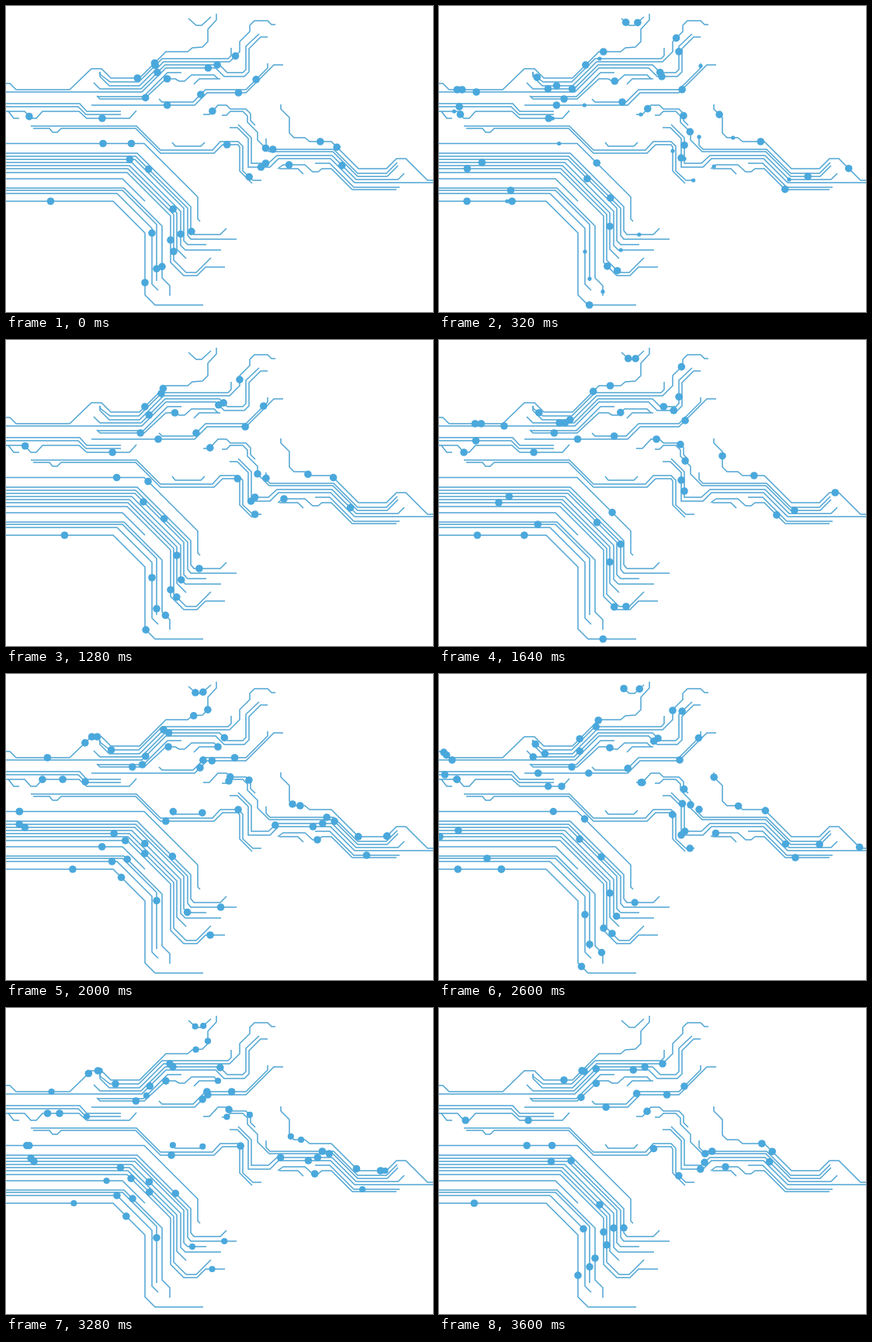
Recreate the animation shown at these times as an HTML page with a canvas. Size 550 by 395 pixels, loop 3640 ms.

```html
<!DOCTYPE html>
<html lang="en">
<head>
<meta charset="utf-8">
<title>Circuit traces</title>
<style>
html, body { margin: 0; width: 100%; height: 100%; overflow: hidden; background: #fff; }
canvas { display: block; }
</style>
</head>
<body>
<canvas id="stage" width="550" height="395"></canvas>
<script>
const ctx = document.getElementById('stage').getContext('2d');
const LOOP = 3640, STEP = 40, HALF = LOOP / 6, CYCLE = 2;
const RADIUS = 4.8, FADE = 0.3;
const traces = [];

// A dot visits distances along its trace at shared beats.
const rider = (lead, ...beats) => (...stops) =>
  ({ lead, keys: stops.map((d, i) => ({ t: beats[i], d })) });
const early = rider(0.04, 1.02, 2.03, 3.02, 3.66, 4.03);
const late = rider(0.1, 2.03, 3.02, 3.66, 4.03);
const long = rider(0.3, 1.66, 3.02, 3.66, 4.03);
const brief = rider(0.3, 1.66, 2.03);

function trace(points, ...dots) {
  const pts = points.split(' ').map(p => p.split(',').map(Number));
  const path = new Path2D(), segs = [];
  let from = 0;
  pts.forEach(([x, y], i) => {
    path.lineTo(x, y);
    if (!i) return;
    const [px, py] = pts[i - 1], len = Math.hypot(x - px, y - py);
    segs.push({ px, py, x, y, len, from });
    from += len;
  });
  traces.push({ path, segs, dots, length: from });
}

// Level from the left edge, then 45 degrees down until x.
function fan(y, turn, x, rest, ...dots) {
  trace(`0,${y} ${turn},${y} ${x},${y + x - turn} ${rest}`.trim(), ...dots);
}

// Upper left
trace('235,16 245,25 252,25 264,14', early(4, 23), early(29, 12));
trace('0,100 5,100 13,108 82,108 110,81 123,81 135,93 172,93 206,59 234,59 240,54 253,53 260,46 260,30 271,18 271,10',
  early(6, 113, 204, 256, 277), early(11, 125, 238, 271, 298), brief(17, 57), brief(109, 132));
trace('121,85 121,88 134,98 171,98 201,68 286,68 290,64 290,54', early(7, 21, 100));
trace('121,85 121,91 133,103 172,103 203,72 288,72 301,59 301,46 314,33 314,25 320,19 337,19 342,24 347,24',
  early(26, 106, 221, 257));
trace('113,99 121,107 174,107 205,76 275,76 285,86 305,86 309,82 309,52 326,36',
  early(11, 113, 188, 206), early(254, 187, 75, 13));
trace('0,111 175,111 206,80 270,80 281,91 307,91 313,85 313,55 328,40 337,40', early(16, 182, 292, 350));
trace('118,117 177,117 208,86 226,86', brief(5, 58));
trace('117,116 121,120 178,120 206,94 218,94 223,97 230,97 239,89 268,89 273,94',
  long(8, 115, 148, 174), long(132, 56, 8));
trace('242,101 249,94 276,94');
trace('110,128 243,128 259,112 309,112 345,76 357,76', early(17, 143, 207, 228), long(208, 83));
trace('197,120 201,124 241,124 257,108 309,108 337,80 337,74', long(10, 156), long(139, 49, 10));

// Far left
trace('0,126 95,126 104,136 148,136');
trace('0,130 93,130 103,140 148,140', early(7, 106));
trace('0,136 24,136 32,145 39,145 47,136 94,136 104,145 159,145 168,135', early(23, 55, 152), early(170, 81, 23));
trace('3,136 10,145 17,145');

// Centre
trace('32,155 168,155 199,186 266,186 276,175 299,175 305,181 305,213 318,225 329,225', long(248, 348));
trace('35,158 56,158 60,163 66,163 71,158 167,158 199,190 268,190 279,179 299,179 301,182 301,213 317,229', late(189, 289));
trace('214,176 218,181 251,181 256,176', brief(7, 2), brief(37, 42));
fan(177.5, 178, 247, '247,275 250,278', late(18, 147), late(18, 191, 297));
trace('254,140 262,140 273,128 284,128 289,133 309,133 315,139 315,148 321,154', early(6, 68), early(81, 42, 8));

// Right
trace('354,127 354,133 365,144 365,164 371,170 385,170 391,175 419,175 454,210 490,210 503,197 515,197 543,225 550,225',
  early(254, 149, 102, 70, 47), early(6, 58), brief(204, 186), late(186, 65));
trace('335,171 335,180 340,185 422,185 453,216 490,216 504,202', long(139, 4));
trace('278,141 284,141 289,136 305,136 311,142 311,150 324,163 324,173 339,188 421,188 453,220 491,220 505,206',
  early(260, 180, 70, 37, 10));
trace('299,153 316,170 316,203 338,203 349,193 420,193 451,224 505,224 513,216', early(20, 91, 202), long(208, 58));
trace('288,157 298,157 312,171 312,208 340,208 351,197 418,197 449,228 550,228', long(206, 67, 10));
trace('398,203 417,203 448,234 507,234', brief(120, 79));
trace('350,210 357,205 385,205 395,214 402,214 407,210 419,210 446,237 503,237', early(127, 56, 8));
trace('352,210 376,210 383,217');

// Lower left
fan(190, 169, 238, '238,290 242,295 276,295 284,287', long(186, 314));
fan(194, 167, 234, '234,296 238,301 297,301', late(18, 226, 306, 342));
fan(198, 166, 229, '229,303 234,308 258,308', late(25, 187, 254, 304));
fan(202, 162, 225, '225,309 231,315 277,315', early(24, 186, 300));
fan(206, 159, 220, '220,314 232,326', long(68, 261, 269));
fan(210, 157, 216, '216,328 232,344 245,344 264,325', early(0, 188, 309, 355));
fan(215, 156, 212, '212,331 229,348 246,348 257,337 282,337', long(73, 292, 339, 358));
fan(223, 150, 179, '', brief(79, 124));
fan(235, 152, 201, '201,351 211,361 211,374', long(75, 300));
fan(238, 150, 194, '194,355', early(61, 223, 279));
fan(242, 143, 188, '188,359 196,367', long(82, 230));
fan(252, 138, 179, '179,373 192,386 254,386', early(24, 86), early(80, 153, 282, 348), late(-52, 80));

// Every half cycle starts slowly and speeds up.
function beatAt(ms) {
  const h = (ms - 80) / HALF, n = Math.floor(h);
  return n + 1 + (h - n) ** 2;
}

function distanceAt(keys, t) {
  let i = keys.findIndex(k => k.t > t);
  if (i < 0) i = keys.length - 1;
  const a = keys[Math.max(0, i - 1)], b = keys[Math.max(1, i)];
  const span = b.t - a.t, s = (t - a.t) / span;
  return a.d + (b.d - a.d) * (span > 0.7 ? s * (1.5 - 0.5 * s) : s);
}

function drawDot({ segs, length }, { lead, keys }, t) {
  const start = keys[0].t - lead, end = keys[keys.length - 1].t + FADE;
  for (let b = t + CYCLE * Math.ceil((start - t) / CYCLE); b < end; b += CYCLE) {
    const d = Math.min(distanceAt(keys, b), length);
    const s = segs.find(q => d <= q.from + q.len) || segs[segs.length - 1];
    const k = (d - s.from) / s.len;
    const size = Math.min(1, (b - start) / 0.03, (end - b) / FADE);
    ctx.beginPath();
    ctx.arc(s.px + (s.x - s.px) * k, s.py + (s.y - s.py) * k, RADIUS * size, 0, 7);
    ctx.fill();
  }
}

ctx.strokeStyle = '#4fa5d3';
ctx.fillStyle = '#4aa8dc';
ctx.lineWidth = 1.5;

function frame() {
  const ms = Math.floor(performance.now() % LOOP / STEP) * STEP;
  const t = (beatAt(ms) + CYCLE) % CYCLE;
  ctx.clearRect(0, 0, 550, 395);
  for (const r of traces) ctx.stroke(r.path);
  for (const r of traces) for (const dot of r.dots) drawDot(r, dot, t);
  requestAnimationFrame(frame);
}
frame();
</script>
</body>
</html>
```
